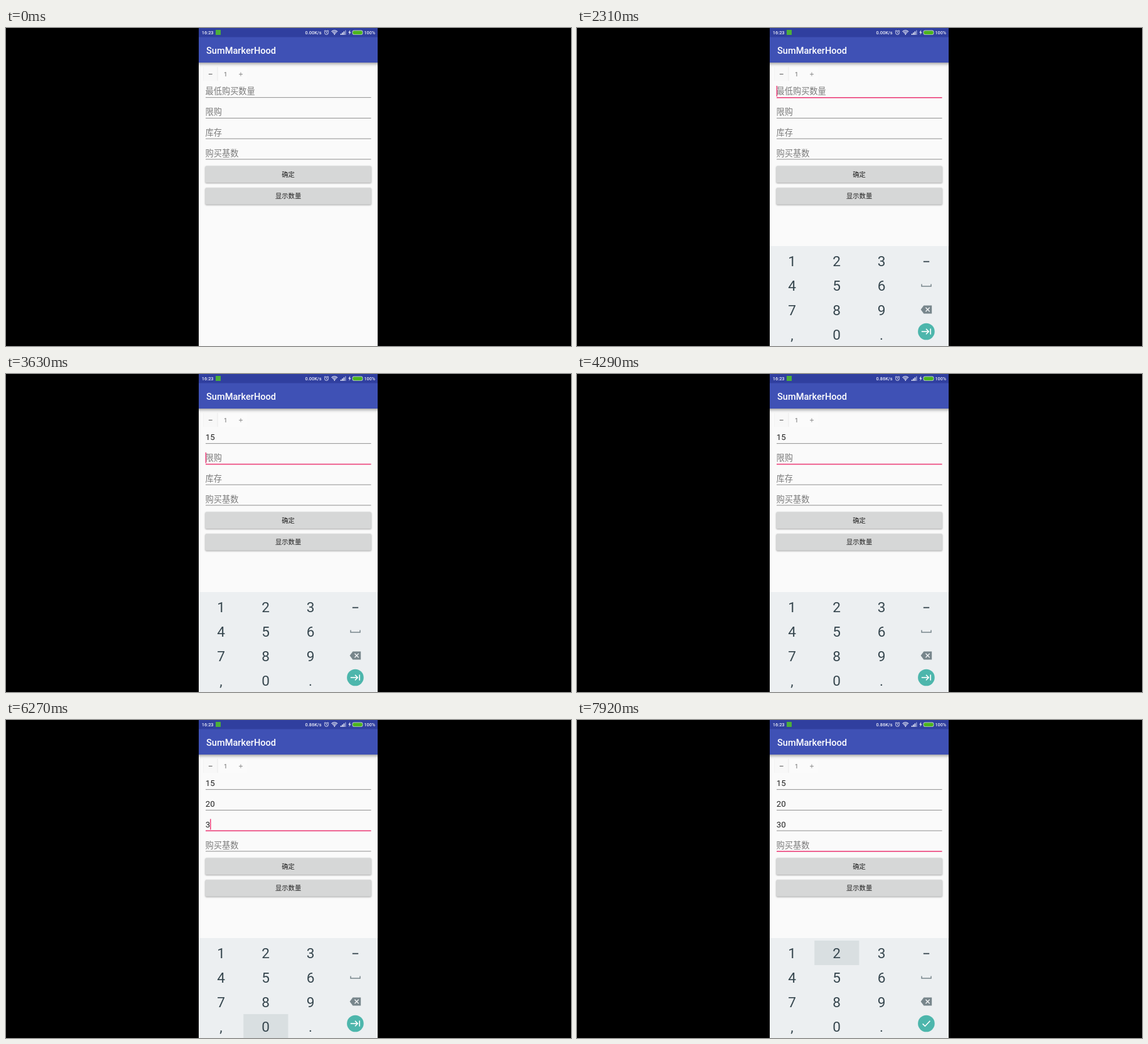
An HTML page with a canvas that plays this animation: 900x506 px, repeating every 8 s.

```html
<!DOCTYPE html>
<html lang="zh-CN">
<head>
<meta charset="utf-8">
<style>
  html, body { margin: 0; width: 100%; height: 100%; overflow: hidden; background: #000; }
  canvas { display: block; }
</style>
</head>
<body>
<canvas id="stage" width="900" height="506"></canvas>
<script>
const ctx = document.getElementById('stage').getContext('2d');
const LOOP = 8000, STEP = 330;
const SANS = 'Roboto, "Noto Sans CJK SC", "Noto Sans CJK", sans-serif';
const PINK = '#ec407a', INK = '#37474f';
const HINTS = ['最低购买数量', '限购', '库存', '购买基数'];
const KEYS = ['123', '456', '789', ',0.'];
const COLUMNS = [342.5, 413.7, 485, 556.4];

// Each entry changes only what it lists, from the given step onward.
const timeline = [
  { at: 0, values: ['', '', '', ''], focus: -1, caret: false, keyboard: false, key: '', speed: '0.00K/s' },
  { at: 6, focus: 0, caret: true },
  { at: 7, keyboard: true },
  { at: 8, key: '1' },
  { at: 9, values: ['1', '', '', ''], key: '5' },
  { at: 10, values: ['15', '', '', ''], key: '' },
  { at: 11, focus: 1 },
  { at: 13, caret: false, speed: '0.86K/s' },
  { at: 14, values: ['15', '2', '', ''], caret: true, key: '0' },
  { at: 15, values: ['15', '20', '', ''], key: '' },
  { at: 16, caret: false },
  { at: 17, focus: 2, caret: true },
  { at: 19, values: ['15', '20', '3', ''], key: '0' },
  { at: 20, values: ['15', '20', '30', ''], key: '' },
  { at: 21, caret: false },
  { at: 22, focus: 3, caret: true },
  { at: 24, caret: false, key: '2' }
];

function stateAt(time) {
  const step = Math.floor(time / STEP);
  return Object.assign({}, ...timeline.filter(entry => entry.at <= step));
}

function rect(x, y, w, h, color) {
  ctx.fillStyle = color;
  ctx.fillRect(x, y, w, h);
}

function roundRect(x, y, w, h, r, color) {
  ctx.fillStyle = color;
  ctx.beginPath();
  ctx.roundRect(x, y, w, h, r);
  ctx.fill();
}

function circle(x, y, r, color) {
  ctx.fillStyle = color;
  ctx.beginPath();
  ctx.arc(x, y, r, 0, Math.PI * 2);
  ctx.fill();
}

function polyline(points, color, width) {
  ctx.strokeStyle = color;
  ctx.lineWidth = width;
  ctx.beginPath();
  points.forEach(([x, y]) => ctx.lineTo(x, y));
  ctx.stroke();
}

function polygon(points, color) {
  ctx.fillStyle = color;
  ctx.beginPath();
  points.forEach(([x, y]) => ctx.lineTo(x, y));
  ctx.fill();
}

function text(string, x, y, size, color, align = 'left', weight = 400) {
  ctx.font = `${weight} ${size}px ${SANS}`;
  ctx.fillStyle = color;
  ctx.textAlign = align;
  ctx.fillText(string, x, y);
}

function shadowed(blur, offset, alpha, draw) {
  ctx.save();
  ctx.shadowColor = `rgba(0, 0, 0, ${alpha})`;
  ctx.shadowBlur = blur;
  ctx.shadowOffsetY = offset;
  draw();
  ctx.restore();
}

function drawStatusBar(speed) {
  const white = '#eceef8';
  rect(307, 0, 285, 14.5, '#303f9f');
  text('16:23', 311.8, 10, 7.4, white, 'left', 500);
  rect(334, 3, 8, 8, '#4caf3a');
  text(speed, 502.6, 10, 7.4, white, 'right', 500);

  ctx.strokeStyle = white;
  ctx.lineWidth = 0.9;
  ctx.beginPath();
  ctx.arc(510.5, 7.4, 3, 0, Math.PI * 2);
  ctx.stroke();
  polyline([[510.5, 5.6], [510.5, 7.6], [512, 8.4]], white, 0.8);
  polyline([[506.8, 5], [508.6, 3.5]], white, 0.9);
  polyline([[512.4, 3.5], [514.2, 5]], white, 0.9);

  for (const r of [2.6, 4.6, 6.6]) {
    ctx.lineWidth = 1.1;
    ctx.beginPath();
    ctx.arc(523.3, 10.4, r, -Math.PI * 0.76, -Math.PI * 0.24);
    ctx.stroke();
  }
  circle(523.3, 10, 0.9, white);

  for (let i = 0; i < 4; i++) {
    const h = 2 + i * 1.8;
    rect(532.8 + i * 2.4, 11 - h, 1.6, h, i < 3 ? white : '#8d97cc');
  }
  polygon([[548.3, 3], [545.2, 7.6], [547.2, 7.6], [546.4, 11], [549.6, 6.4], [547.6, 6.4]], white);
  roundRect(551.5, 3.6, 17, 7.4, 3, '#b9c6d4');
  roundRect(552.3, 4.4, 15.4, 5.8, 2.4, '#4cb51d');
  text('100%', 588, 10, 7.2, white, 'right', 500);
}

function drawStepper() {
  rect(314, 62, 70, 22, '#fbfbfb');
  rect(314, 62, 23, 22, '#f8f8f8');
  rect(314, 62, 0.8, 22, '#f0f0f0');
  rect(336.5, 62, 1, 22, '#eaeaea');
  rect(322.8, 72.9, 5.8, 1.1, '#666');
  text('1', 349.7, 77.2, 9.6, '#666', 'center');
  rect(371, 73, 6, 0.9, '#888');
  rect(373.5, 70.5, 0.9, 6, '#888');
}

function drawField(index, value, focused, caret) {
  const lineY = 110.6 + index * 32.75;
  const baseline = lineY - 5.2;
  if (value) text(value, 317.8, baseline, 13.2, '#202020');
  else text(HINTS[index], 317.6, baseline, 13.2, '#7b7b7b');

  if (focused) rect(318, lineY - 0.6, 263.5, 1.6, PINK);
  else rect(318, lineY - 0.4, 263.5, 0.9, '#858585');

  if (focused && caret) {
    ctx.font = `400 13.2px ${SANS}`;
    rect(317.6 + ctx.measureText(value).width, lineY - 18.6, 1.5, 17, PINK);
  }
}

function drawButton(label, y) {
  shadowed(2.5, 1, 0.35, () => roundRect(317.5, y, 264.3, 26.5, 1.6, '#d6d7d7'));
  text(label, 449.6, y + 17.2, 10.3, '#222', 'center', 500);
}

function drawActionKey(done) {
  circle(556.4, 483, 13.3, '#4db6ac');
  if (done) {
    polyline([[550.6, 483.4], [554.4, 487.2], [562.4, 478.8]], '#fff', 1.6);
    return;
  }
  polyline([[548.8, 483], [560, 483]], '#fff', 1.6);
  polyline([[556, 478.8], [560.2, 483], [556, 487.2]], '#fff', 1.6);
  rect(562.4, 478.4, 1.6, 9.2, '#fff');
}

function drawKeyboard(pressed, done) {
  rect(307, 347, 285, 159, '#eceff1');
  KEYS.forEach((row, r) => [...row].forEach((label, c) => {
    if (label === pressed) rect(378.2 + (c - 1) * 71.2, 351 + r * 39, 71.2, 39, '#d9dfe1');
    text(label, COLUMNS[c], 379.3 + r * 38.8, 22.6, INK, 'center');
  }));
  rect(551.8, 370.8, 9.4, 1.8, INK);
  polyline([[549, 407.4], [549, 411], [564, 411], [564, 407.4]], '#78868c', 1.5);
  polygon([[547.6, 448], [552.4, 441.5], [565.2, 441.5], [565.2, 454.5], [552.4, 454.5]], '#78868c');
  polyline([[555.4, 444.8], [561.8, 451.2]], '#eceff1', 1.5);
  polyline([[561.8, 444.8], [555.4, 451.2]], '#eceff1', 1.5);
  drawActionKey(done);
}

function draw(state) {
  rect(0, 0, 900, 506, '#000');
  ctx.save();
  ctx.beginPath();
  ctx.rect(307, 0, 285, 506);
  ctx.clip();

  rect(307, 0, 285, 506, '#fafafa');
  drawStepper();
  shadowed(5, 2, 0.4, () => rect(300, 14, 300, 41, '#3f51b5'));
  drawStatusBar(state.speed);
  text('SumMarkerHood', 319, 41, 14.6, '#fff', 'left', 500);
  state.values.forEach((value, i) => drawField(i, value, i === state.focus, state.caret));
  drawButton('确定', 219.5);
  drawButton('显示数量', 254.2);
  if (state.keyboard) drawKeyboard(state.key, state.focus === 3);
  ctx.restore();
}

function tick() {
  draw(stateAt(performance.now() % LOOP));
  requestAnimationFrame(tick);
}
tick();
</script>
</body>
</html>
```
